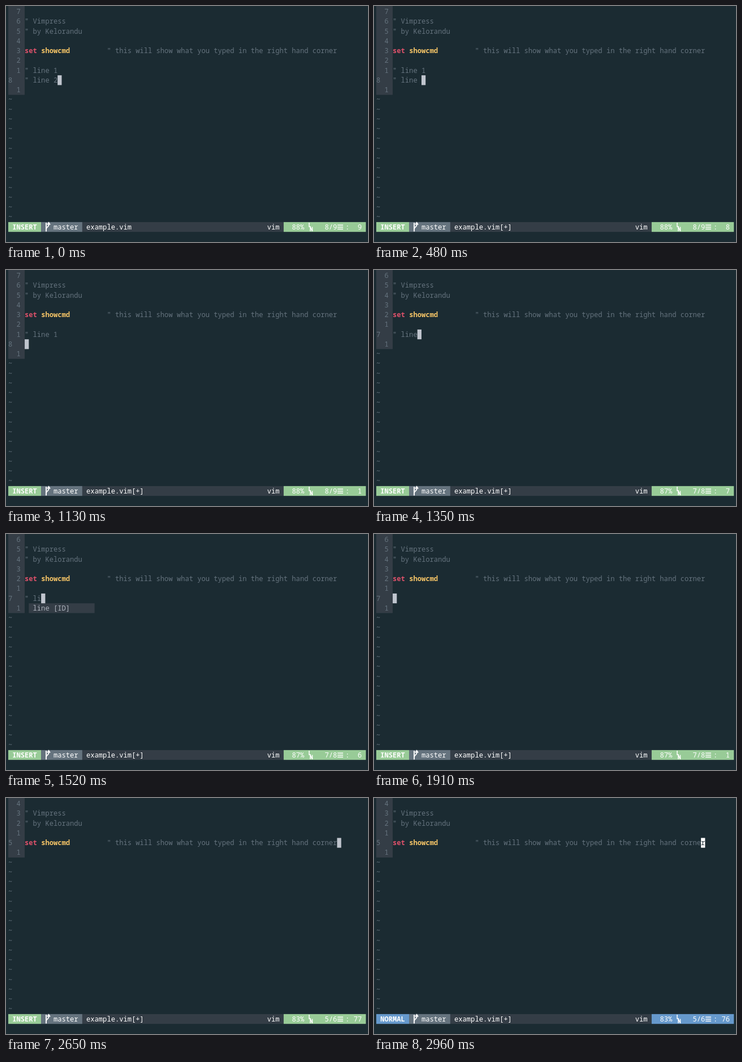
An HTML page for the animation above (3.01 s loop, 640 px wide and 416 px high).

```html
<!DOCTYPE html>
<html lang="en">
<head>
<meta charset="utf-8">
<title>Backspacing in insert mode</title>
<style>
html, body { margin: 0; width: 100%; height: 100%; overflow: hidden; background: #1b2b32; }
svg { display: block; width: 640px; height: 416px; }
text { white-space: pre; font-family: "Source Code Pro", "Noto Sans Mono", "DejaVu Sans Mono", monospace; font-weight: 500; }
text.strong { font-weight: 600; }
</style>
</head>
<body>
<svg id="stage" viewBox="0 0 640 416"></svg>
<script>
const LOOP = 3010;
const CELL = 7.267, LINE = 17.25, LEFT = 4, TOP = 1.4, BASELINE = 12.8;
const GUTTER = 4, STATUS_ROW = 22;
const C = {
  bg: '#1b2b32', panel: '#343d46', muted: '#65737e', menu: '#adb3bd', text: '#c0c5ce', white: '#ffffff',
  red: '#e0526b', yellow: '#f6c567', green: '#98cb97', blue: '#6699cc'
};

const START = [
  '',
  '" Vimpress',
  '" by Kelorandu',
  '',
  'set showcmd         " this will show what you typed in the right hand corner',
  '',
  '" line 1',
  '" line 2',
  ''
];

// One tap, the repeats of a held Backspace, a last tap, then Escape.
const REPEAT_START = 520, REPEAT_EVERY = 90;
const BACKSPACES = [145, ...Array.from({ length: 17 }, (_, i) => REPEAT_START + i * REPEAT_EVERY), 2500];
const ESCAPE = 2870;

const stage = document.getElementById('stage');
const family = getComputedStyle(stage.appendChild(
  document.createElementNS('http://www.w3.org/2000/svg', 'text'))).fontFamily;
const ruler = document.createElement('canvas').getContext('2d');
ruler.font = `500 100px ${family}`;
stage.setAttribute('font-size', (CELL * 100 / ruler.measureText('0').width).toFixed(3));

const colX = col => LEFT + col * CELL;
const rowY = row => TOP + row * LINE;
const escapeText = s => s.replace(/&/g, '&amp;').replace(/</g, '&lt;');

function label(col, row, value, fill, strong) {
  return `<text x="${colX(col)}" y="${rowY(row) + BASELINE}" fill="${fill}"${strong ? ' class="strong"' : ''}>${escapeText(String(value))}</text>`;
}

function block(col, row, cols, fill) {
  return `<rect x="${colX(col)}" y="${rowY(row)}" width="${cols * CELL}" height="${LINE}" fill="${fill}"/>`;
}

function icon(d, width) {
  return `<path d="${d}" fill="none" stroke="${C.white}" stroke-width="${width}"/>`;
}

function editorAt(time) {
  const lines = [...START];
  const presses = BACKSPACES.filter(at => at <= time).length;
  let row = 7, col = lines[row].length;
  for (let i = 0; i < presses; i++) {
    if (col > 0) {
      lines[row] = lines[row].slice(0, --col);
    } else {
      col = lines[row - 1].length;
      lines.splice(row--, 1);
    }
  }
  const normal = time >= ESCAPE;
  if (normal) col--;
  const popup = !normal && ['" li', '" lin'].includes(lines[row]);
  return { lines, row, col, normal, popup, modified: presses > 0 };
}

function codeLine(line, row) {
  if (!line.startsWith('set')) return label(GUTTER, row, line, C.muted);
  return label(GUTTER, row, 'set', C.red, true)
    + label(GUTTER + 4, row, 'showcmd', C.yellow, true)
    + label(GUTTER + 20, row, line.slice(20), C.muted);
}

function buffer({ lines, row, col, normal, popup }) {
  let out = `<rect x="${LEFT}" width="${GUTTER * CELL}" height="${rowY(lines.length)}" fill="${C.panel}"/>`;
  lines.forEach((line, i) => {
    const number = i === row ? row + 1 : Math.abs(i - row);
    out += label(i === row ? 0 : 2, i, number, C.muted) + codeLine(line, i);
  });
  for (let i = lines.length; i < STATUS_ROW; i++) out += label(0, i, '~', C.muted);
  if (popup) out += block(5, row + 1, 16, C.panel) + label(6, row + 1, 'line [ID]', C.menu);
  out += block(GUTTER + col, row, 1, normal ? C.white : C.text);
  if (normal) out += label(GUTTER + col, row, lines[row][col], C.bg);
  return out;
}

function statusBar({ lines, row, col, normal, popup, modified }) {
  const accent = normal ? C.blue : C.green;
  const line = row + 1, total = lines.length;
  // The column readout trails by one while the menu is open.
  const column = String(col + 1 + (popup ? 1 : 0));
  const put = (at, value, strong) => label(at, STATUS_ROW, value, C.white, strong);
  return block(0, STATUS_ROW, 87, C.panel)
    + block(0, STATUS_ROW, 8, accent)
    + block(8, STATUS_ROW, 10, C.muted)
    + block(67, STATUS_ROW, 20, accent)
    + put(1, normal ? 'NORMAL' : 'INSERT', true)
    + icon('M71 382V397.5M71 393.5C71 389 75.5 390 75.5 386V383M73 385.5L75.5 382L78 385.5', 1.9)
    + put(11, 'master')
    + put(19, 'example.vim' + (modified ? '[+]' : ''))
    + put(63, 'vim')
    + put(69, Math.floor(line / total * 100) + '%')
    + icon('M536 382V389H539M538 397V389.5L541.5 397V389.5', 1.5)
    + put(77, `${line}/${total}`)
    + icon('M586 386.3H596M586 389.8H596M586 393.3H596', 1.5)
    + put(82, ':')
    + put(86 - column.length, column);
}

let shown = '';
function draw(time) {
  const state = editorAt(time);
  const picture = `<rect width="640" height="416" fill="${C.bg}"/>` + buffer(state) + statusBar(state);
  if (picture !== shown) stage.innerHTML = shown = picture;
}

const began = performance.now();
function tick() {
  draw((performance.now() - began) % LOOP);
  requestAnimationFrame(tick);
}
tick();
</script>
</body>
</html>
```
